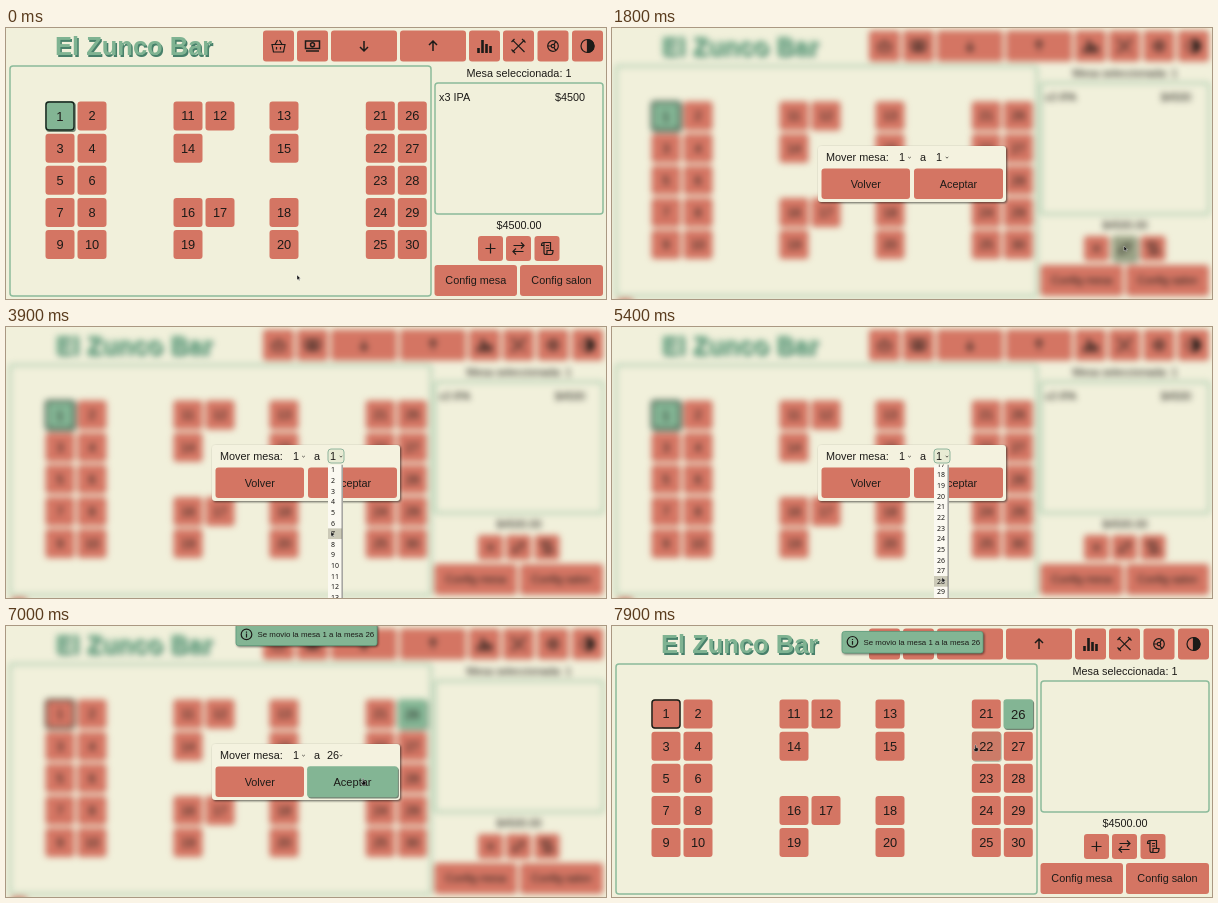
Recreate the animation shown at these times as an HTML page. Size 600 px wide and 271 px high, loop 8 s.

```html
<!DOCTYPE html>
<html lang="es">
<head>
<meta charset="utf-8">
<style>
  html, body { margin: 0; width: 100%; height: 100%; overflow: hidden; background: #f1f0db; }
  svg { display: block; }
  text { font: 10.85px "Liberation Sans", Arial, sans-serif; fill: #1d1b18; }
  .title { font-size: 25.5px; font-weight: bold; fill: #7fb392; text-shadow: 1.4px 1.4px .4px #47806a; }
  .table { font-size: 12.8px; }
  .option { font: 7px "Noto Sans", sans-serif; }
  .toast { font-size: 7.9px; }
  .icon { fill: none; stroke: #1d1b18; stroke-width: 1.2; }
  .panel { fill: none; stroke: #8cbb9b; stroke-width: 1.5; }
  .modal { fill: #f4f2df; filter: drop-shadow(1px 1.5px 1.2px #0009); }
  .button { transform-box: fill-box; transform-origin: center; }
</style>
</head>
<body>
<script>
const LOOP = 8000, ROW = 10.65, LIST_TOP = 137.5, FADE = 250;
const RED = [212, 117, 99], GREEN = [131, 181, 148];

function el(parent, tag, attrs = {}, text = '') {
  const node = document.createElementNS('http://www.w3.org/2000/svg', tag);
  for (const name in attrs) node.setAttribute(name, attrs[name]);
  node.textContent = text;
  return parent.appendChild(node);
}
const box = (parent, x, y, width, height, attrs) =>
  el(parent, 'rect', { x, y, width, height, rx: 3, ...attrs });
const label = (parent, x, y, text, attrs) =>
  el(parent, 'text', { x, y, dy: '.35em', ...attrs }, text);
const centered = { 'text-anchor': 'middle' };
const icon = (parent, x, y, d, style = '') =>
  el(parent, 'path', { class: 'icon', d, style, transform: `translate(${x} ${y})` });
const show = (node, visible) => node.style.display = visible ? '' : 'none';

const buttons = [];
function button(parent, x, y, w, h, text, attrs) {
  const group = el(parent, 'g', { class: 'button' });
  const shadow = box(group, x + 1, y + 1.2, w, h, { fill: '#3d5546' });
  const face = box(group, x, y, w, h);
  if (text) label(group, x + w / 2, y + h / 2, text, { ...centered, ...attrs });
  const item = { x, y, w, h, group, face, shadow, inModal: parent === modal };
  buttons.push(item);
  return item;
}
function iconButton(x, y, w, h, d, style) {
  button(room, x, y, w, h);
  icon(room, x + w / 2, y + h / 2, d, style);
}
const circle = (r, y = 0) => `M${-r} ${y}a${r} ${r} 0 1 0 ${2 * r} 0a${r} ${r} 0 1 0 ${-2 * r} 0`;

const stage = el(document.body, 'svg', { width: 600, height: 271 });
const room = el(stage, 'g');
const modal = el(stage, 'g');

// Room: header, tables and order panel
label(room, 49, 18.5, 'El Zunco Bar', { class: 'title' });
box(room, 4, 38, 421, 230, { class: 'panel' });
box(room, 429, 55, 168, 131, { class: 'panel' });
box(room, 5, 271, 16, 12, { fill: '#d47563' });

const header = [
  [257, 31, 'M-6.5-1.5H6.5L5 6H-5ZM-3.5-1.5L-1-6M3.5-1.5L1-6M-2 1V3.5M2 1V3.5'],
  [291, 31, 'M-7-5H7V2.5H-7ZM-6.5 5H6.5' + circle(2, -1.2), 'stroke-width:1.5'],
  [325, 66, 'M0-5V5M-4 1L0 5L4 1', 'stroke-width:1.5'],
  [394, 66, 'M0 5V-5M-4-1L0-5L4-1', 'stroke-width:1.5'],
  [463, 31, 'M-6 7V2M-2 7V-6M2 7V-2M6 7V0', 'stroke-width:2.6'],
  [497, 31, 'M-6-6L6 6M6-6L-6 6M-7 3.5L-3.5 7M3.5-7L7-3.5M-7-4L-4-7'],
  [531.5, 31, circle(5.3) + circle(1.7) + 'M-5.3 0H-1.7M1-1.5L2.7-4.6M1 1.5L2.7 4.6'],
  [566, 31, circle(6.5)]
];
header.forEach(([x, w, d, style]) => iconButton(x, 2.5, w, 31, d, style));
icon(room, 581.5, 18, 'M0-6.5A6.5 6.5 0 0 1 0 6.5Z', 'fill:#1d1b18');

const columns = [39.5, 71.5, 167.5, 199.5, 263.5, 359.8, 391.8];
const layout = [
  [1, 2, 11, 12, 13, 21, 26],
  [3, 4, 14, 0, 15, 22, 27],
  [5, 6, 0, 0, 0, 23, 28],
  [7, 8, 16, 17, 18, 24, 29],
  [9, 10, 19, 0, 20, 25, 30]
];
layout.forEach((row, r) => row.forEach((id, c) => {
  if (id) button(room, columns[c], 73.5 + r * 32.15, 29, 29, id, { class: 'table' }).id = id;
}));
box(room, 40, 74, 28, 28, { fill: 'none', stroke: '#16201a', 'stroke-width': 1.4 });

label(room, 513, 45, 'Mesa seleccionada: 1', centered);
const order = el(room, 'g');
label(order, 433, 69, 'x3 IPA');
label(order, 549, 69, '$4500');
label(room, 513, 197, '$4500.00', centered);
iconButton(472, 208, 25, 25, 'M-5 0H5M0-5V5');
iconButton(500, 208, 25, 25, 'M-5-3H5.5M2.5-6L5.5-3L2.5 0M5 3H-5.5M-2.5 0L-5.5 3L-2.5 6');
iconButton(528.5, 208, 25, 25,
  'M-3-6H3.5V2M-3-6Q-5.5-6-5.5-3H-3M-3-6V4Q-3 6-1 6H4Q6 6 6 2H0V4Q0 6-1 6M-1-3H2M-1-.5H2');
button(room, 428.5, 237, 82.5, 31, 'Config mesa');
button(room, 514, 237, 83, 31, 'Config salon');

// Dialog
box(modal, 206, 118, 188, 56, { class: 'modal' });
label(modal, 214, 129, 'Mover mesa:');
label(modal, 290, 129, '1', centered);
label(modal, 311, 129, 'a', centered);
const focusRing = box(modal, 322, 122, 16, 14, { fill: '#e8ebd4', stroke: '#8fb49c' });
const choice = label(modal, 327, 129, '1', centered);
for (const x of [297.5, 335]) icon(modal, x, 129.5, 'M-1.3-.5L0 .6L1.3-.5', 'stroke-width:.7');
button(modal, 209.5, 140.5, 88.5, 30.5, 'Volver');
button(modal, 302, 140.5, 89, 30.5, 'Aceptar');

const list = el(modal, 'svg', { x: 322, y: LIST_TOP, width: 15, height: 134 });
box(list, 0, 0, 15, 140, { fill: '#fbf9f1', rx: 0 });
const options = el(list, 'g');
const highlight = box(options, 0, 0, 14, ROW, { fill: '#cbc9b7', rx: 0 });
for (let i = 1; i <= 30; i++) label(options, 3, (i - .5) * ROW, i, { class: 'option' });
box(list, 13.7, 0, .8, 140, { fill: '#555', rx: 0 });

// Toast
const toast = el(stage, 'g');
box(toast, 230, 0, 141, 21.5, {
  fill: '#83b594', stroke: '#5c9c7b', 'stroke-width': .8, rx: 2.5,
  style: 'filter:drop-shadow(1px 1px 1px #0008)'
});
icon(toast, 240.5, 10.3, circle(5.3) + 'M0-.8V3M0-2.8V-1.7');
label(toast, 251.5, 10.5, 'Se movio la mesa 1 a la mesa 26', { class: 'toast' });

const pointer = el(stage, 'path', { fill: '#111', stroke: '#fff', 'stroke-width': .35 });
const ARROW = 'M0 0V5L1.2 3.9L2 5.6L2.8 5.2L2 3.6H3.6Z';
const HAND = 'M-.5-.5H.6V2L2.8 2.6V4.4L2 6H-.6L-2.2 3.6L-1.6 3.1L-.5 3.8Z';

// Timeline
const isModal = t => t >= 1750 && t < 7500;
const isOpen = t => t >= 2850 && t < 5950;
const isMoved = t => t >= 6750;
const clamp = v => Math.min(1, Math.max(0, v));
const progress = (t, from, to) => clamp((t - from) / (to - from));
const smooth = p => p * p * (3 - 2 * p);

// start, end, x, y of each pointer move
const moves = [
  [650, 1320, 512, 218], [1900, 2600, 330, 129], [3000, 3850, 325, 204.5],
  [3900, 4200, 327, 211], [5100, 5400, 330, 250.5], [5500, 5800, 330, 234],
  [6000, 6400, 357, 153], [7080, 7350, 256, 155], [7640, 7960, 374, 116]
];
function pointerAt(t) {
  let x = 291, y = 247;
  for (const [from, to, toX, toY] of moves) {
    const p = smooth(progress(t, from, to));
    x += (toX - x) * p;
    y += (toY - y) * p;
  }
  return { x, y };
}
function isHovered(b, t, p) {
  return b.inModal === isModal(t) && !isOpen(t) &&
    p.x > b.x && p.x < b.x + b.w && p.y > b.y && p.y < b.y + b.h;
}

function render(t) {
  const p = pointerAt(t);
  const trail = Array.from({ length: 10 }, (_, k) => {
    const time = t - k * FADE / 10;
    return { time, at: pointerAt(time) };
  });
  for (const b of buttons) {
    // Share of the recent past spent active gives a linear colour fade
    const active = trail.filter(({ time, at }) =>
      b.id === (isMoved(time) ? 26 : 1) || isHovered(b, time, at));
    const heat = active.length / trail.length;
    const rgb = RED.map((v, i) => Math.round(v + (GREEN[i] - v) * heat));
    b.face.setAttribute('fill', `rgb(${rgb})`);
    b.shadow.setAttribute('opacity', Math.min(.7, heat * 3));
    b.group.style.transform = `scale(${1 + .02 * heat})`;
  }

  room.style.filter = isModal(t) ? 'blur(3px)' : '';
  show(modal, isModal(t));
  show(order, !isMoved(t));
  show(list, isOpen(t));
  show(focusRing, isOpen(t));
  choice.textContent = t < 5950 ? 1 : 26;

  const scroll = 176 * smooth(progress(t, 4350, 4900));
  const row = Math.max(0, Math.floor((p.y - LIST_TOP + scroll) / ROW));
  options.setAttribute('transform', `translate(0 ${-scroll})`);
  highlight.setAttribute('y', row * ROW);

  const slide = 1 - (1 - progress(t, 6850, 7150)) ** 2;
  show(toast, t >= 6850);
  toast.setAttribute('transform', `translate(0 ${-24.5 + 30 * slide})`);

  pointer.setAttribute('d', buttons.some(b => isHovered(b, t, p)) ? HAND : ARROW);
  pointer.setAttribute('transform', `translate(${p.x} ${p.y})`);
}

function frame() {
  render(performance.now() % LOOP);
  requestAnimationFrame(frame);
}
frame();
</script>
</body>
</html>
```
